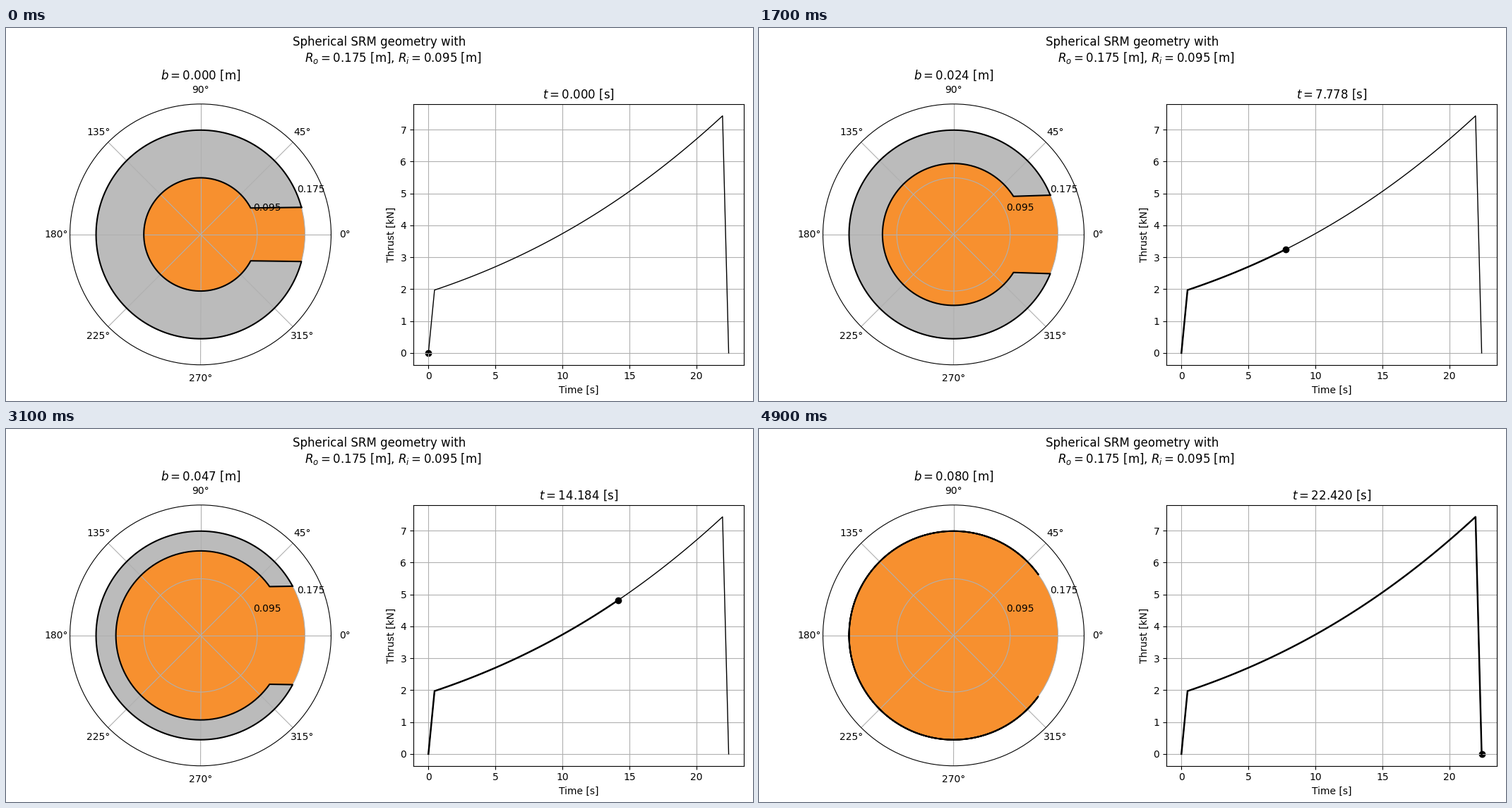
Animation of 1058 by 529 pixels, one loop 5000 ms. Source, as a matplotlib script:

```python
import numpy as np
import matplotlib.pyplot as plt
from matplotlib.animation import FuncAnimation

W, H, DPI = 1058, 529, 100
FRAMES, INTERVAL = 50, 100
R_OUT, R_IN = 0.175, 0.095
T_END = 22.42

plt.rcParams["font.family"] = "DejaVu Sans"

time = np.linspace(0, T_END, FRAMES)
t0 = time[1]
thrust = 1.973 * np.exp(0.0717 * (time - t0) - 0.000447 * (time**2 - t0**2))
thrust[[0, -1]] = 0

q = time / T_END
burn = 0.0635 * q + 0.0165 * q**2


def grain_outline(b):
    """Closed outline (theta, r) of the remaining propellant."""
    r = R_IN + b
    slot_out = np.radians(15.05 + 308 * b - 600 * b**2)
    slot_in = np.arcsin((0.0443 + 0.825 * b - 0.45 * b**2) / r)
    outer = np.linspace(slot_out, 2 * np.pi - slot_out, 300)
    inner = np.linspace(2 * np.pi - slot_in, slot_in, 300)
    theta = np.concatenate([outer, inner, outer[:1]])
    radius = np.concatenate([np.full(300, R_OUT), np.full(300, r), [R_OUT]])
    return theta, radius


def add_axes(left, right, top=107.8, bottom=477.7, **kwargs):
    """Add axes from pixel edges measured from the top left."""
    box = [left / W, 1 - bottom / H, (right - left) / W, (bottom - top) / H]
    return fig.add_axes(box, **kwargs)


fig = plt.figure(figsize=(W / DPI, H / DPI), dpi=DPI)
fig.suptitle("Spherical SRM geometry with\n"
             rf"$\hspace{{2.42}}R_o={R_OUT}$ [m], $R_i={R_IN}$ [m]")

# Cross-section
polar = add_axes(90.5, 460.5, projection="polar")
circle = np.linspace(0, 2 * np.pi, 400)
polar.fill(circle, np.full(400, R_OUT), fc="#f7902f")
theta, radius = grain_outline(0)
grain, = polar.fill(theta, radius, fc="#bbbbbb")
edge, = polar.plot(theta, radius, "k", lw=1.5)
polar.set_rlim(0, 1.25 * R_OUT)
polar.set_rgrids([R_IN, R_OUT])

# Thrust curve
chart = add_axes(577, 1044.8)
chart.plot(time, thrust, "k", lw=1)
trace, = chart.plot([], [], "k", lw=1.75)
dot = chart.scatter([0], [0], color="k")
chart.set_xlim(-0.05 * T_END, 1.05 * T_END)
chart.set_ylim(-0.05 * thrust.max(), 1.05 * thrust.max())
chart.set_xlabel("Time [s]")
chart.set_ylabel("Thrust [kN]")
chart.grid()


def update(i):
    theta, radius = grain_outline(burn[i])
    grain.set_xy(np.column_stack([theta, radius]))
    edge.set_data(theta, radius)
    trace.set_data(time[:i + 1], thrust[:i + 1])
    dot.set_offsets([[time[i], thrust[i]]])
    polar.set_title(f"$b={burn[i]:.3f}$ [m]")
    chart.set_title(f"$t={time[i]:.3f}$ [s]")
    return grain, edge, trace, dot


anim = FuncAnimation(fig, update, frames=FRAMES, interval=INTERVAL, repeat=True)
plt.show()
```
